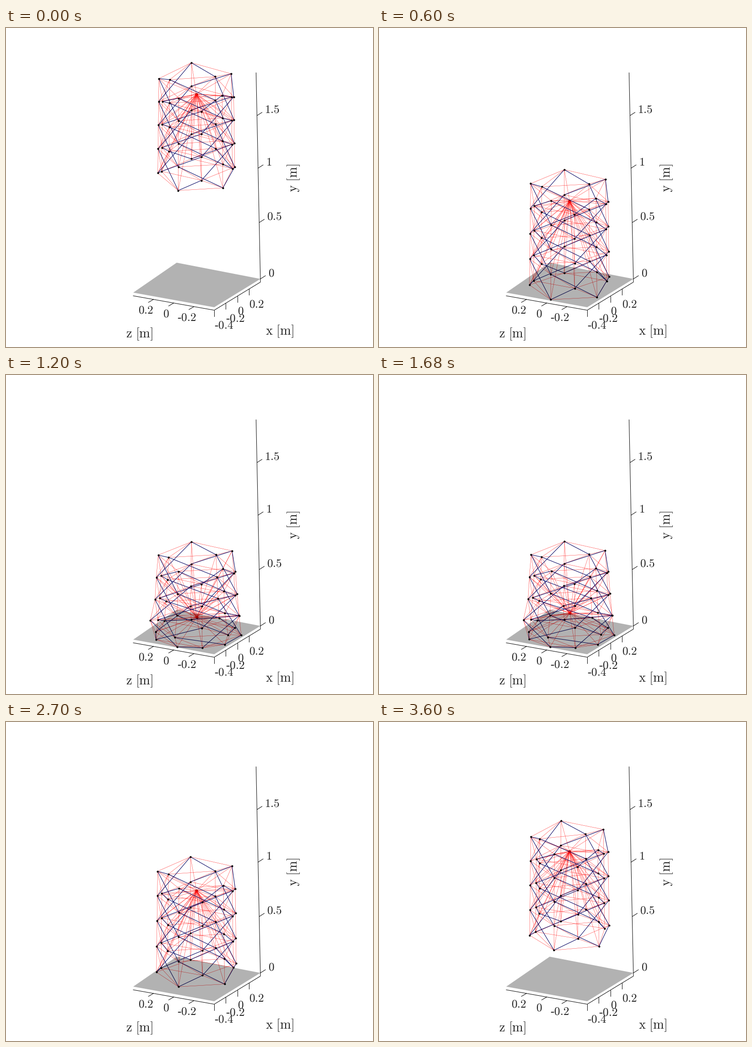
Recreate the animation shown at these times as a matplotlib script. Size 802 px wide and 698 px high, loop 3.66 s.

```python
import numpy as np
import matplotlib.pyplot as plt
from matplotlib.animation import FuncAnimation
from matplotlib.collections import LineCollection

W, H, DPI = 802, 698, 100
STEP, FRAMES = 60, 61
PX = 72 / DPI  # points per pixel

plt.rcParams["font.family"] = "Liberation Serif"
plt.rcParams["mathtext.fontset"] = "cm"

# Tower: nine levels of five nodes, alternate levels turned by 36 degrees
LEVELS, SIDES = 9, 5
GAP, RADIUS, REST = 0.1145, 0.866, -0.01
LEVEL = np.repeat(np.arange(LEVELS), SIDES)
ANGLE = 72 * np.tile(np.arange(SIDES), LEVELS) + 36 * (LEVEL % 2 == 0)
PAYLOAD = LEVELS * SIDES

# Impact, deepest crush, end of the crush and lift-off, in ms
HIT, DEEP, FREE, LIFT = 600, 1450, 2500, 2580

# Rows give u, v and w from (1, x, z, height)
CAMERA = np.array([
    [416.6, 36.8, -97.0, 14.6],
    [565.0, -48.3, -26.3, -228.4],
    [1.0, -0.0293, -0.017, 0.0356],
])

PAYLOAD_KEYS = [(540, 0.873), (HIT, 0.77), (1200, 0.142), (1400, 0.114),
                (1680, 0.178), (2220, 0.496), (2700, 0.812), (3600, 1.184)]


def smooth(keys, t):
    """Cubic Hermite curve through (time, value) keys, straight before the first."""
    ts, vs = np.array(keys, float).T
    slopes = np.gradient(vs, ts)
    if t < ts[0]:
        return vs[0] + slopes[0] * (t - ts[0])
    i = min(np.searchsorted(ts, t, side="right") - 1, len(ts) - 2)
    d = ts[i + 1] - ts[i]
    p = (t - ts[i]) / d
    return (vs[i] * (1 + 2 * p) * (1 - p) ** 2 + vs[i + 1] * p * p * (3 - 2 * p)
            + d * slopes[i] * p * (1 - p) ** 2 - d * slopes[i + 1] * p * p * (1 - p))


def base_height(t):
    if t < HIT:
        return 1.005 - 0.00165 * t - 8e-8 * t * t
    up = max(0, t - LIFT)
    return REST + 0.00054 * up - 1.45e-7 * up * up


def crush_at(t):
    """0 for the free shape, 1 for the deepest crush."""
    if t <= HIT or t >= FREE:
        return 0
    if t < DEEP:
        return np.sin(np.pi / 2 * (t - HIT) / (DEEP - HIT)) ** 0.4
    return np.cos(np.pi / 2 * (t - DEEP) / (FREE - DEEP))


def nodes_at(t):
    crush = crush_at(t)
    sag = 0.103 * LEVEL ** 0.4
    bulge = (0.12 * np.exp(-((LEVEL - 1.6) / 1.2) ** 2)
             + 0.04 * np.sin(np.pi * LEVEL / 7))
    radius = RADIUS + bulge * crush ** 0.55
    turn = 5 * max(0, t - 2400) / 1200
    a = np.radians(ANGLE + turn)
    x = np.append(radius * np.cos(a), 0)
    z = np.append(radius * np.sin(a), 0)
    h = np.append(base_height(t) + GAP * LEVEL - crush * sag, smooth(PAYLOAD_KEYS, t))
    u, v, w = CAMERA @ np.array([np.ones_like(x), x, z, h])
    return np.column_stack([u / w, v / w])


def node(level, k):
    return level * SIDES + k % SIDES


def build_links():
    bars, strings = [], []
    for lv in range(LEVELS):
        even = lv % 2 == 0
        for k in range(SIDES):
            n = node(lv, k)
            strings += [(n, node(lv, k + 1)), (n, PAYLOAD)]
            if lv >= 1:
                strings.append((n, node(lv - 1, k + 1 if even else k)))
            if lv >= 2:
                strings.append((n, node(lv - 2, k)))
                bars.append((n, node(lv - 2, k + 1 if even else k - 1)))
            if lv == LEVELS - 1:
                bars.append((n, node(lv - 1, k)))
            if lv == 1:
                bars.append((n, node(0, k - 1)))
    return np.array(bars), np.array(strings)


BARS, STRINGS = build_links()

fig = plt.figure(figsize=(W / DPI, H / DPI), dpi=DPI, facecolor="white")
ax = fig.add_axes([0, 0, 1, 1])
ax.set_xlim(0, W)
ax.set_ylim(H, 0)
ax.axis("off")


def line(*points):
    ax.plot(*zip(*points), color="black", lw=1.0 * PX, zorder=1)


def label(pos, text, ha="center", em=25.3, rotation=0):
    sign = "-" if text.startswith("-") else ""
    body = text.lstrip("-").replace(" ", r"\ ")
    ax.text(*pos, sign + r"$\mathrm{" + body + "}$", fontsize=em * PX, ha=ha,
            va="center", rotation=rotation, color="#222222", zorder=1)


def ticks(start, end, fractions, values, stroke, shift, ha):
    for f, value in zip(fractions, values):
        p = start + f * (end - start)
        line(p, p + stroke)
        label(p + shift, f"{value:g}", ha)


# Axes, ticks and labels
left, front, right, ground, top = np.array(
    [(278, 586), (455, 617.5), (556, 556), (556, 549), (546.5, 98)])
line(left, front, right, top)

quarters = np.arange(4) / 4
rise = np.arange(4) * 0.5 / 1.92
depth = 0.069  # foreshortening along the upright axis
ticks(left, front, quarters[1:], (0.2, 0, -0.2), (-11, 6.5), (-16.5, 25), "center")
ticks(front, right, quarters, (-0.4, -0.2, 0, 0.2), (0, 13), (0, 34), "left")
ticks(ground, top, rise * (1 + depth) / (1 + depth * rise), (0, 0.5, 1, 1.5),
      (11, -7), (17, -12), "left")

label((292, 670), "z [m]", em=28.6)
label((598, 663.5), "x [m]", em=28.6)
label((629, 328), "y [m]", em=28.6, rotation=90)

# Moving parts, with the see-through ground in front of them
strings = LineCollection([], colors="red", linewidths=0.45 * PX, zorder=2)
bars = LineCollection([], colors="#000060", linewidths=1.05 * PX, zorder=3)
ax.add_collection(strings)
ax.add_collection(bars)
dots, = ax.plot([], [], "o", color="black", ms=4.2 * PX, mew=0, zorder=4)
load, = ax.plot([], [], "o", color="#200000", ms=6 * PX, mew=0, zorder=1.5)
ax.fill([278, 373, 556, 455], [579, 513.5, 549, 611], color="black", alpha=0.3,
        lw=0, zorder=5)


def draw(i):
    pts = nodes_at(i * STEP)
    strings.set_segments(pts[STRINGS])
    bars.set_segments(pts[BARS])
    dots.set_data(pts[:PAYLOAD, 0], pts[:PAYLOAD, 1])
    load.set_data(pts[PAYLOAD:, 0], pts[PAYLOAD:, 1])
    return strings, bars, dots, load


anim = FuncAnimation(fig, draw, frames=FRAMES, interval=STEP, repeat=True, blit=False)
plt.show()
```
